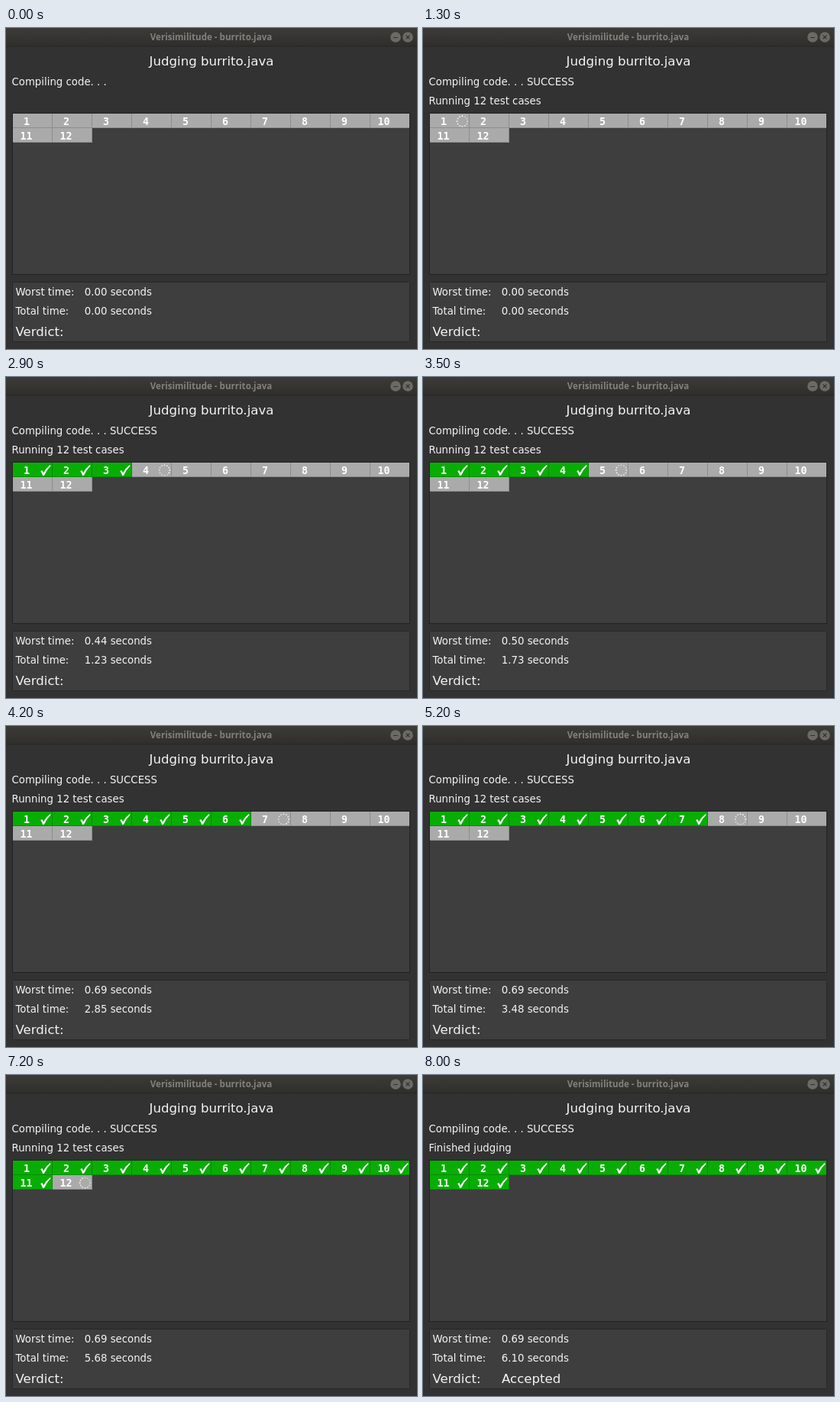
An HTML page that plays this animation: 538 by 420 pixels, repeating every 10000 ms.

```html
<!DOCTYPE html>
<html lang="en">
<head>
<meta charset="utf-8">
<title>Judging</title>
<style>
  html, body { margin: 0; width: 100%; height: 100%; overflow: hidden; background: #323232; }
  svg { display: block; width: 538px; height: 420px; }
  text { font-family: "DejaVu Sans", sans-serif; font-size: 13.3px; fill: #f4f4f4; white-space: pre; }
  text.big { font-size: 16.6px; }
  text.bar { font: 700 11.6px "Open Sans", sans-serif; fill: #83817b; }
  .mid { text-anchor: middle; }
  .cell text { font: bold 13.3px "DejaVu Sans Mono", monospace; fill: #fff; }
  .cell .bg { fill: #aaa; }
  .cell .edge { fill: #8c8c8c; }
  .cell .check { fill: #fff; visibility: hidden; }
  .done .bg { fill: #08ad04; }
  .done .edge { fill: #078c05; }
  .done .check { visibility: visible; }
  .panel { fill: #3e3e3e; stroke: #222; }
</style>
</head>
<body>
<svg viewBox="0 0 538 420">
  <defs>
    <linearGradient id="barFill" x2="0" y2="1">
      <stop offset="0" stop-color="#3c3b38"/>
      <stop offset="1" stop-color="#2f2e2c"/>
    </linearGradient>
  </defs>
  <rect width="538" height="420" fill="#323232"/>
  <rect width="538" height="24" fill="url(#barFill)"/>
  <rect y="23.5" width="538" height="1" fill="#272725"/>
  <text class="bar mid" x="268.5" y="16">Verisimilitude - burrito.java</text>
  <g fill="#6b6a65" stroke="#31302d" stroke-width="1.2">
    <circle cx="510" cy="12" r="6.8" stroke="none"/>
    <circle cx="526" cy="12" r="6.8" stroke="none"/>
    <path d="M507 12.5h6M523.6 9.6l4.8 4.8m0-4.8l-4.8 4.8"/>
  </g>

  <text class="big mid" x="269" y="49">Judging burrito.java</text>
  <text id="compile" x="7.5" y="75"></text>
  <text id="status" x="7.5" y="99.5"></text>

  <rect class="panel" x="8.5" y="111.5" width="520" height="211"/>
  <g id="grid"></g>
  <g id="spinner" fill="#fff"></g>

  <rect class="panel" x="8.5" y="332.5" width="520" height="78" rx="1" style="stroke:#272727"/>
  <text x="12.5" y="350">Worst time:</text>
  <text x="12.5" y="374.5">Total time:</text>
  <text class="big" x="12.5" y="402.5">Verdict:</text>
  <text id="worst" x="102.8" y="350"></text>
  <text id="total" x="102.8" y="374.5"></text>
  <text id="verdict" class="big" x="103" y="402.5"></text>
</svg>
<script>
const LOOP = 10000, START = 1300, TICK = 100, DOTS = 12;
const times = [0.38, 0.44, 0.41, 0.50, 0.69, 0.43, 0.63, 0.62, 0.64, 0.56, 0.38, 0.42];

const $ = id => document.getElementById(id);

function add(parent, name, attrs, text) {
  const el = document.createElementNS("http://www.w3.org/2000/svg", name);
  for (const key in attrs) el.setAttribute(key, attrs[key]);
  if (text) el.textContent = text;
  return parent.appendChild(el);
}

const cellX = i => 9 + (i % 10) * 52;
const cellY = i => 112 + Math.floor(i / 10) * 19;
const seconds = value => value.toFixed(2) + " seconds";

const cells = times.map((_, i) => {
  const g = add($("grid"), "g", { class: "cell", transform: `translate(${cellX(i)} ${cellY(i)})` });
  add(g, "rect", { class: "edge", width: i % 10 === 9 ? 51 : 52, height: 19 });
  add(g, "rect", { class: "bg", width: 51, height: 18 });
  add(g, "text", { class: "mid", x: i < 9 ? 18 : 17.5, y: 15 }, String(i + 1));
  add(g, "path", { class: "check", d: "M36.2 11.2L38.2 10Q39.4 11.4 40 13.6Q43.4 7 48.6 3.2L49.8 4Q44.6 9.2 41.2 16.6L39.2 17.2Q38.2 13.4 36.2 11.2Z" });
  return g;
});

const dots = Array.from({ length: DOTS }, (_, k) => {
  const a = k / DOTS * 2 * Math.PI;
  return add($("spinner"), "circle", { cx: 6.8 * Math.sin(a), cy: -6.8 * Math.cos(a), r: 0.95 });
});

function setText(id, text) {
  if ($(id).textContent !== text) $(id).textContent = text;
}

function render(now) {
  const t = Math.floor(now % LOOP / TICK) * TICK;
  const running = t >= START;
  let done = 0, total = 0, worst = 0;
  while (done < times.length && t >= START + Math.round((total + times[done]) * 1000)) {
    total += times[done];
    worst = Math.max(worst, times[done++]);
  }
  const finished = done === times.length;

  setText("compile", "Compiling code. . ." + (running ? " SUCCESS" : ""));
  setText("status", finished ? "Finished judging" : running ? "Running 12 test cases" : "");
  setText("worst", seconds(worst));
  setText("total", seconds(total));
  setText("verdict", finished ? "Accepted" : "");
  cells.forEach((cell, i) => cell.classList.toggle("done", i < done));

  const spin = running && !finished;
  $("spinner").setAttribute("visibility", spin ? "visible" : "hidden");
  if (spin) {
    $("spinner").setAttribute("transform", `translate(${cellX(done) + 42.5} ${cellY(done) + 10})`);
    const head = Math.floor((t - START) / TICK);
    dots.forEach((dot, k) => {
      const age = ((head - k) % DOTS + DOTS) % DOTS;
      dot.setAttribute("opacity", (1 - 0.6 * age / DOTS).toFixed(2));
    });
  }
}

function frame() {
  render(performance.now());
  requestAnimationFrame(frame);
}
frame();
</script>
</body>
</html>
```
